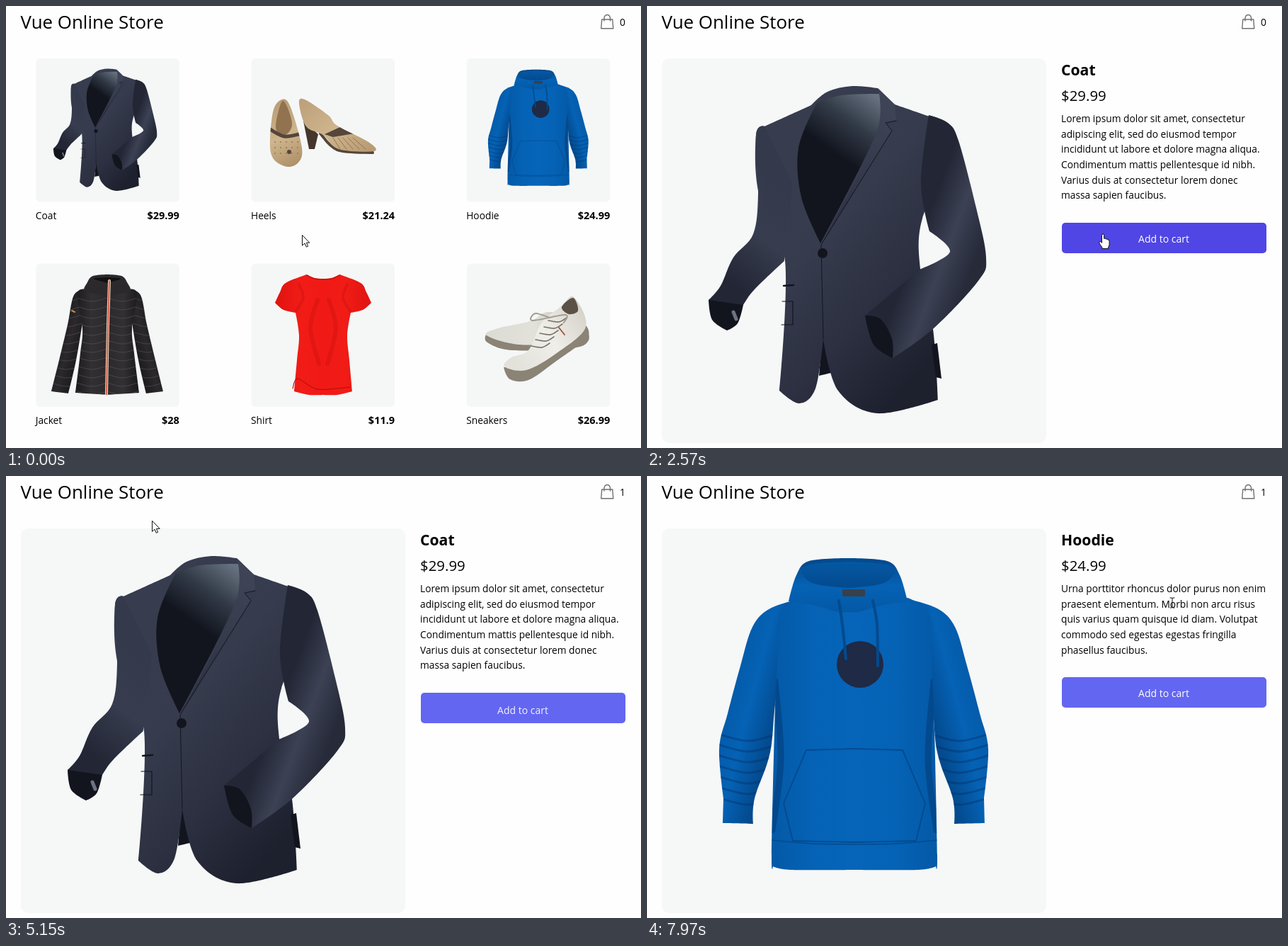
Write an HTML page with a canvas that moves like this. It is 897 px wide and 624 px high and loops after 8000 ms.

```html
<!DOCTYPE html>
<html lang="en">
<head>
<meta charset="utf-8">
<title>Vue Online Store</title>
<style>
html, body { margin: 0; width: 100%; height: 100%; overflow: hidden; background: #fefefe; }
canvas { display: block; width: 897px; height: 624px; }
</style>
</head>
<body>
<canvas id="stage"></canvas>
<script>
const W = 897, H = 624, LOOP = 8000;
const canvas = document.getElementById('stage');
const ctx = canvas.getContext('2d');
const dpr = window.devicePixelRatio || 1;
canvas.width = W * dpr;
canvas.height = H * dpr;

// ---------- drawing helpers ----------
const cache = new Map();

// Smooth path through "x,y" points; a trailing "!" makes a sharp corner.
function curve(s, closed) {
  const key = s + closed;
  if (cache.has(key)) return cache.get(key);
  const pts = s.split(' ').map(w => [...w.split(',').map(parseFloat), w.endsWith('!')]);
  const n = pts.length, path = new Path2D();
  const at = i => closed ? pts[(i + n) % n] : pts[Math.max(0, Math.min(n - 1, i))];
  const slope = (i, k) => at(i)[2] ? 0 : (at(i + 1)[k] - at(i - 1)[k]) / 6;
  path.moveTo(pts[0][0], pts[0][1]);
  for (let i = 0; i < (closed ? n : n - 1); i++) {
    const a = at(i), b = at(i + 1);
    path.bezierCurveTo(a[0] + slope(i, 0), a[1] + slope(i, 1),
      b[0] - slope(i + 1, 0), b[1] - slope(i + 1, 1), b[0], b[1]);
  }
  if (closed) path.closePath();
  cache.set(key, path);
  return path;
}

function line(color, width, s) {
  ctx.strokeStyle = color;
  ctx.lineWidth = width;
  ctx.lineCap = 'round';
  ctx.stroke(curve(s, false));
}

// Filled outline with optional details clipped to it.
function shape(fill, s, details) {
  const path = curve(s, true);
  ctx.fillStyle = fill;
  ctx.fill(path);
  if (!details) return;
  ctx.save();
  ctx.clip(path);
  details();
  ctx.restore();
}

// Draws one half, then its mirror image; x counts from the axis.
function both(axis, half) {
  for (const side of [1, -1]) {
    ctx.save();
    ctx.translate(axis, 0);
    ctx.scale(side, 1);
    half();
    ctx.restore();
  }
}

function grad(x0, y0, x1, y1, ...colors) {
  const g = ctx.createLinearGradient(x0, y0, x1, y1);
  colors.forEach((c, i) => g.addColorStop(i / (colors.length - 1), c));
  return g;
}

function box(x, y, w, h, r, fill) {
  ctx.fillStyle = fill;
  ctx.beginPath();
  ctx.roundRect(x, y, w, h, r);
  ctx.fill();
}

function disc(x, y, r, fill) {
  ctx.fillStyle = fill;
  ctx.beginPath();
  ctx.arc(x, y, r, 0, 7);
  ctx.fill();
}

function text(s, x, y, size = 13.75, weight = 400, align = 'left', color = '#000') {
  ctx.font = `${weight} ${size}px "Open Sans", "Noto Sans", sans-serif`;
  ctx.textAlign = align;
  ctx.fillStyle = color;
  ctx.fillText(s, x, y);
}

// ---------- products ----------
function coat() {
  const cloth = '#373c4e', shade = '#222635', dark = '#12151e';
  shape(dark, '250,440! 243,522! 264,517!');
  shape(grad(160, 250, 420, 480, cloth, '#363b4d', '#2c3041', '#1d202d'),
    '166,170! 232,140! 255,121 290,113 326,116! 350,139! 425,165! 440,200! 389,300 387,380 404,456 411,556! 325,575 270,543 249,470! 238,540 215,561 187,543! 195,360 158,265 154,182');
  shape(grad(318, 125, 262, 205, '#66717f', '#323a47', dark),
    '240,137! 275,126 328,124! 332,155 305,220 245,335! 218,270 214,200');
  shape(grad(260, 300, 345, 150, '#2c3142', '#3e4356'),
    '327,117! 350,139! 352,162! 337,165! 346,176! 246,337! 300,235 328,165');
  line(dark, 1, '352,162! 337,165! 346,176! 246,337! 249,470');
  shape(grad(105, 380, 200, 260, shade, cloth, '#343a4b'),
    '166,170! 154,182 157,265 150,322 122,355 104,395 87,415! 113,458! 134,425 152,400 194,360! 206,250!');
  shape(dark, '87,415! 136,422! 128,448 113,458! 92,443');
  line('#6c7480', 5, '122,432 126,442');
  shape(grad(395, 300, 475, 330, shade, '#3c4154', '#262a39'),
    '398,154! 425,165 440,190 465,285 479,355 468,388 405,455 347,497! 308,437! 385,372! 428,347 399,318! 387,250');
  shape(dark, '308,437! 330,442 346,470 347,497! 320,478');
  shape(dark, '402,478! 410,476! 416,526! 408,524!');
  disc(248, 349, 7, dark);
  line(dark, 1.2, '191,417! 206,417! 206,450! 190,450!');
  line(dark, 2.5, '193,395 207,394');
}

function hoodie() {
  const blue = '#0562b5', deep = '#034a8e', soft = 'rgba(2,45,100,.4)';
  both(292, () => {
    shape(grad(110, 340, 186, 320, deep, blue, '#0459a6'),
      '70,172! 118,187 143,213 160,268 178,335 190,385 184,455! 185,490! 142,491! 140,455 118,390 107,300', () => {
        for (let y = 365; y < 460; y += 15) line(soft, 3, `110,${y} 150,${y + 9} 195,${y - 2}`);
      });
  });
  both(293, () => {
    shape(grad(0, 0, 118, 0, '#0665b9', blue, '#0459a6'),
      '-1,170! 75,172! 106,195 109,260 113,360 117,535 115,551! 90,556 -1,556!', () => {
        line(soft, 9, '112,290 104,400 116,500');
        line(deep, 1.5, '-1,520 60,519 118,514');
      });
    line(deep, 1.8, '-1,385 68,387! 100,462! 87,515! -1,517');
  });
  both(284, () => {
    shape(grad(0, 120, 0, 190, deep, blue, '#0459a6'),
      '-1,116! 55,120 73,140 84,177! 50,182 15,192 -1,192!');
    shape(grad(0, 120, 0, 158, '#0558a4', deep), '-1,121! 48,124 66,134 48,152 -1,158!');
  });
  box(276, 160, 32, 10, 1, '#38404c');
  disc(301, 266, 33, '#1e2a46');
  line(deep, 4, '271,176 276,210 281,258');
  line(deep, 4, '319,176 325,210 326,268');
}

function heels() {
  const hide = '#ceb58d', trim = '#56453a', stitch = '#8f7251';
  shape(grad(374, 140, 418, 225, '#b99d76', hide, '#ab8c64'),
    '390,132 402,143 418,200 412,222 393,226 374,207 377,150', () => {
      shape('#92734f', '389,136 397,142 404,168 394,182 381,172');
      line(trim, 5, '373,174 393,184 414,181');
      for (let i = 0; i < 15; i++) disc(380 + i % 5 * 8, 192 + Math.floor(i / 5) * 8, .9, stitch);
    });
  disc(400, 206, 3, trim);
  shape('#44362c', '420,162! 441,181! 436,202! 428,202!');
  line(trim, 4, '444,180 468,203 518,207');
  shape(grad(420, 135, 500, 215, '#bea17b', hide, '#b99c74'),
    '414,137 422,132 455,154 468,169 512,192 520,205 470,202 448,182 424,170', () => {
      shape(trim, '450,181! 474,170! 492,180! 462,185!');
      for (let i = 0; i < 5; i++) line(stitch, 1, `${462 + i * 7},186 ${472 + i * 9},202`);
    });
}

function jacket() {
  const black = '#2b292c', edge = '#1a191b', seam = 'rgba(95,91,95,.55)';
  const quilt = x => {
    for (let y = 412; y < 545; y += 12) line(seam, 1, `${x},${y} ${x + 22},${y + 5} ${x + 46},${y - 1}`);
  };
  both(143, () => {
    shape(grad(35, 480, 72, 470, edge, black, edge),
      '30,400! 47,408 56,450 68,500 79,544! 55,547! 44,500 34,440', () => quilt(36));
    shape(grad(0, 0, 45, 0, black, '#323033', edge),
      '-1,395! 25,399 42,406 35,455 38,490 45,546! -1,549!', () => quilt(0));
    shape(black, '-1,379! 20,381 28,390 31,403 -1,408!');
    shape('#111012', '-1,383! 19,385 -1,391!');
  });
  line('#e5cdb5', 4, '146,388 144,450 142,548');
  line('#d4523b', 1.7, '146,388 144,450 142,548');
  line('#c88a4c', 2, '93,430 97,432');
}

function shirt() {
  const red = '#f01915', fold = 'rgba(150,0,0,.17)';
  both(448, () => {
    shape(grad(0, 0, 60, 0, red, '#f21c17', '#e31511'),
      '-1,385! 12,384 23,379! 53,391 61,404 68,419! 56,429 39,433! 34,465 37,500 41,544! 20,549 -1,549!', () => {
        line(fold, 4, '38,430 28,412 34,393');
        line(fold, 6, '8,415 18,455 6,505');
      });
    line('#b00d0a', 1, '-1,386 12,385 23,380');
  });
  line('#b00d0a', 1.1, '405,540 412,526 440,541 486,538');
}

function sneakers() {
  const sole = '#8b8375', hide = '#e2e1da', lace = '#77716a';
  shape(sole, '678,464! 725,476 820,452! 823,472 800,483 715,486 680,475');
  shape(grad(680, 450, 810, 470, '#dcdbd3', hide, '#bbb7ac'),
    '679,465 695,455 740,445 765,432 803,440 819,456 790,474 725,478');
  shape(sole, '703,510! 745,505 790,472 818,450! 821,468 775,503 738,528 712,527');
  shape(grad(715, 500, 815, 430, hide, '#efeee9', '#d6d3ca'),
    '704,509 714,496 738,486 756,448 784,424 802,411 819,453 778,490 735,514');
  shape('#5b5146', '785,425 801,412 808,430 795,435');
  for (let i = 0; i < 5; i++) {
    const x = 742 + i * 6, y = 480 - i * 9;
    line(lace, 1.6, `${x},${y} ${x + 15},${y + 2} ${x + 26},${y - 4}`);
  }
  line('#a39e94', 2, '768,440 748,434 744,444 790,436 788,447');
  line('#9c5b3c', 2, '781,454 789,464');
}

// ---------- layout ----------
const products = [
  { name: 'Coat', price: '$29.99', draw: coat, large: true,
    info: ['Lorem ipsum dolor sit amet, consectetur', 'adipiscing elit, sed do eiusmod tempor',
      'incididunt ut labore et dolore magna aliqua.', 'Condimentum mattis pellentesque id nibh.',
      'Varius duis at consectetur lorem donec', 'massa sapien faucibus.'] },
  { name: 'Heels', price: '$21.24', draw: heels },
  { name: 'Hoodie', price: '$24.99', draw: hoodie, large: true,
    info: ['Urna porttitor rhoncus dolor purus non enim', 'praesent elementum. Morbi non arcu risus',
      'quis varius quam quisque id diam. Volutpat', 'commodo sed egestas egestas fringilla',
      'phasellus faucibus.'] },
  { name: 'Jacket', price: '$28', draw: jacket },
  { name: 'Shirt', price: '$11.9', draw: shirt },
  { name: 'Sneakers', price: '$26.99', draw: sneakers }
];
const [coatPage, , hoodiePage] = products;

const CARD = 202.6, BIG = 543, LINE = 21.65;
const cardX = i => 42.3 + (i % 3) * 304.2;
const cardY = i => 74 + Math.floor(i / 3) * 289.4;
const button = p => [586, Math.round(176 + p.info.length * LINE), 289, 43];

function header(count) {
  text('Vue Online Store', 20.5, 32, 25.9);
  ctx.save();
  ctx.translate(836.4, 9.3);
  ctx.scale(1.07, 1.07);
  ctx.lineJoin = 'round';
  line('#707070', 1.3, '16,11! 16,7! 14.8,4.2 12,3 9.2,4.2 8,7! 8,11!');
  line('#707070', 1.3, '5,9! 19,9! 20,21! 4,21! 5,9!');
  ctx.restore();
  text(count, 871, 28, 13.75, 400, 'center');
}

function grid() {
  products.forEach((p, i) => {
    const x = cardX(i), y = cardY(i);
    box(x, y, CARD, CARD, 6, '#f5f7f7');
    ctx.save();
    if (p.large) {
      ctx.translate(x, y);
      ctx.scale(CARD / BIG, CARD / BIG);
      ctx.translate(-21, -74);
    }
    p.draw();
    ctx.restore();
    text(p.name, x - .5, y + 227);
    text(p.price, x + CARD, y + 227, 14.5, 700, 'right');
  });
}

const clamp = k => Math.max(0, Math.min(1, k));
const slide = (t, start) => 1 - (1 - clamp((t - start) / 250)) ** 1.7;

// Button caption: out upwards, then the next one in from below.
function caption(t) {
  const out = s => ({ dy: -27 * slide(t, s), alpha: 1 - slide(t, s) });
  const into = s => ({ dy: 27 * (1 - slide(t, s)), alpha: slide(t, s) });
  if (t < 3105) return { added: false, ...out(2740) };
  if (t < 4712) return { added: true, ...into(3105) };
  if (t < 4962) return { added: true, ...out(4712) };
  return { added: false, ...into(4962) };
}

function detail(p, t, hover) {
  box(21, 74, BIG, BIG, 11, '#f6f7f7');
  p.draw();
  text(p.name, 585, 98, 21.2, 700);
  text(p.price, 585, 133.5, 20.4);
  p.info.forEach((s, i) => text(s, 585, 164 + i * LINE));
  const [x, y, w, h] = button(p), c = caption(t);
  box(x, y, w, h, 5, hover ? '#4f46e5' : '#6366f1');
  ctx.save();
  ctx.beginPath();
  ctx.rect(x, y, w, h);
  ctx.clip();
  ctx.globalAlpha = c.alpha;
  ctx.translate(0, y + c.dy);
  if (c.added) {
    line('#fff', 1.5, '674,23! 678.5,28! 687.5,15.5!');
    text('Added to cart!', 698, 27.5, 14, 400, 'left', '#fff');
  } else {
    text('Add to cart', 730, 27.5, 14, 400, 'center', '#fff');
  }
  ctx.restore();
}

// ---------- pointer ----------
// Each step glides to a point, then presses there.
const steps = [
  { start: 570, end: 1080, x: 150, y: 164, pace: .6, press: 1330, release: 1390 },
  { start: 1830, end: 2630, x: 647, y: 324, pace: .6, press: 2730, release: 2830 },
  { start: 4620, end: 5420, x: 177, y: 27, pace: .4, press: 5620, release: 5720 },
  { start: 6150, end: 6880, x: 739, y: 177, pace: .6, press: 7140, release: 7240 }
];
const [openCoat, addCoat, goHome, openHoodie] = steps;
const smooth = k => k * k * (3 - 2 * k);

function pointer(t) {
  let x = 418, y = 323;
  for (const s of steps) {
    const k = clamp((t - s.start) / (s.end - s.start));
    x += (s.x - x) * smooth(k ** s.pace);
    y += (s.y - y) * smooth(k ** (s.pace * 1.5));
  }
  // a slight drift over the text at the end
  if (t >= openHoodie.release) x += t < 7690 ? 2 : 3;
  if (t >= openHoodie.release) y += t < 7970 ? 1 : 2;
  return { x, y };
}

const hit = (m, x, y, w, h) => m.x >= x && m.x <= x + w && m.y >= y && m.y <= y + h;

function cursorKind(m, page) {
  if (hit(m, 21, 5, 201, 38)) return 'hand';
  if (!page) return products.some((p, i) => hit(m, cardX(i), cardY(i), CARD, 231)) ? 'hand' : 'arrow';
  if (hit(m, ...button(page))) return 'hand';
  return hit(m, 585, 78, 290, 72 + page.info.length * LINE) ? 'beam' : 'arrow';
}

const glyphs = {
  arrow: new Path2D('M.5 .5V15.2L4 12L6.3 17.2L8.6 16.2L6.4 11.2H10.8Z'),
  hand: new Path2D('M-1.6 12V1.8Q-1.6 0 0 0Q1.6 0 1.6 1.8V6.4Q3.6 5.2 4.4 7.2Q6.4 6 7 8.2Q9 7.6 9 10V15Q8.6 17.5 7.4 18.6V20.6H-1.2V18.6Q-3.6 16 -5.2 12.6Q-5.6 10.6 -4 10.6Q-2.8 10.6 -1.6 12Z'),
  beam: new Path2D('M-3 -7H-1Q0 -7 0 -6Q0 -7 1 -7H3M0 -6V6M-3 7H-1Q0 7 0 6Q0 7 1 7H3')
};

function cursor(m, kind) {
  ctx.save();
  ctx.translate(m.x, m.y);
  ctx.lineJoin = 'round';
  ctx.lineWidth = 1;
  ctx.strokeStyle = '#111';
  ctx.fillStyle = '#fff';
  if (kind !== 'beam') ctx.fill(glyphs[kind]);
  ctx.stroke(glyphs[kind]);
  ctx.restore();
}

// ---------- timeline ----------
function pageAt(t) {
  if (t >= openHoodie.release) return hoodiePage;
  return t >= openCoat.release && t < goHome.release ? coatPage : null;
}

function render(t) {
  const page = pageAt(t), m = pointer(t);
  ctx.setTransform(dpr, 0, 0, dpr, 0, 0);
  ctx.fillStyle = '#fefefe';
  ctx.fillRect(0, 0, W, H);
  header(t < addCoat.press + 30 ? '0' : '1');
  if (page) detail(page, t, hit(m, ...button(page)));
  else grid();
  if (steps.some(s => t >= s.press && t < s.release)) disc(m.x, m.y, 11.3, 'rgba(240,208,10,.56)');
  // the ring is still up in the last moment before the hoodie opens
  cursor(m, cursorKind(m, page));
}

const begin = performance.now();
function tick() {
  render((performance.now() - begin) % LOOP);
  requestAnimationFrame(tick);
}
tick();
</script>
</body>
</html>
```
